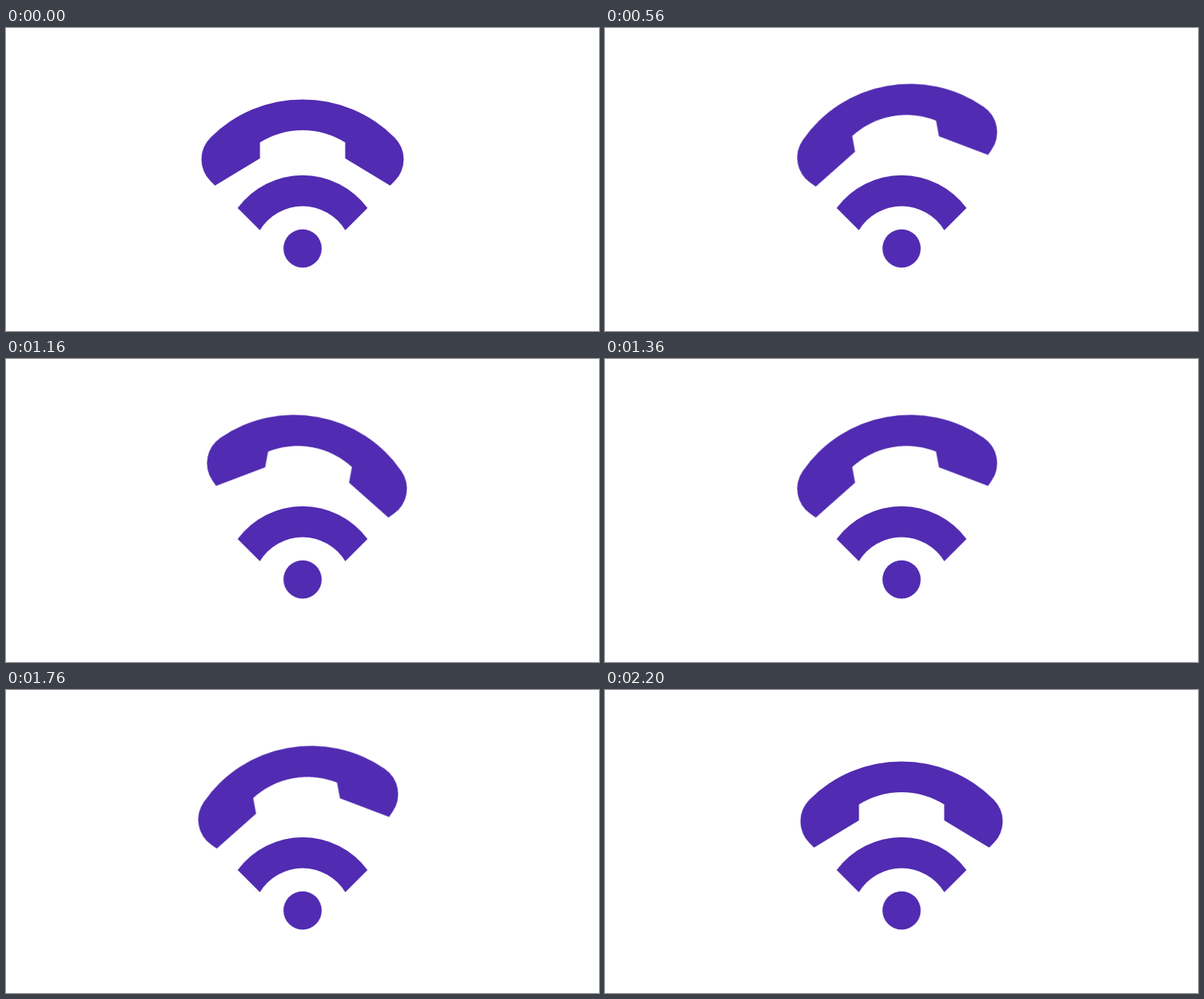
Recreate the animation shown at these times as an HTML page without scripts. Size 800 by 409 pixels, loop 2.4 s.

```html
<!DOCTYPE html>
<html lang="en">
<head>
<meta charset="utf-8">
<title>Ringing phone</title>
<style>
  html, body { margin: 0; width: 100%; height: 100%; overflow: hidden; background: #fff; }
  svg { display: block; width: 100vw; height: 100vh; fill: #512bb1; }

  .handset {
    transform-origin: 0 210px;
    animation: ring 2400ms cubic-bezier(.333, 0, .667, 1) infinite;
  }

  /* Lift, swing every 200 ms, then hang up and rest */
  @keyframes ring {
    0%, 91.667%, 100% { transform: translateY(0) rotate(0deg); }
    8.333%, 25%, 41.667%, 58.333%, 75% { transform: translateY(-20px) rotate(-13deg); }
    16.667%, 33.333%, 50%, 66.667%, 83.333% { transform: translateY(-20px) rotate(13deg); }
  }
</style>
</head>
<body>
<svg viewBox="0 0 800 409">
  <g transform="translate(400.1 0)">
    <path class="handset" d="M-118.2 212.7L-124.3 206.6A41.5 41.5 0 0 1 -124.3 147.9A175.8 175.8 0 0 1 124.3 147.9A41.5 41.5 0 0 1 124.3 206.6L118.2 212.7L57.5 176V154.4A108.6 108.6 0 0 0 -57.5 154.4V176Z"/>
    <path d="M-87.6 243A108.8 108.8 0 0 1 87.6 243L57.6 273A67.3 67.3 0 0 0 -57.6 273Z"/>
    <circle cy="297.6" r="25.8"/>
  </g>
</svg>
</body>
</html>
```
